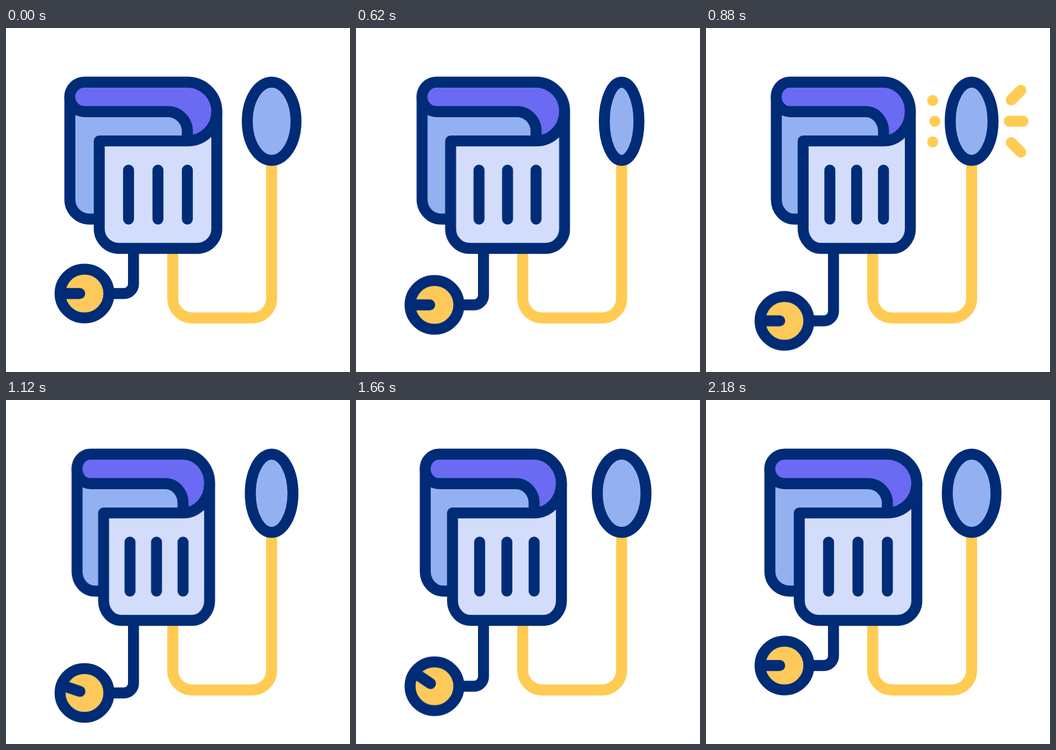
Write an HTML page that moves like this. It is 640x640 px and loops after 2400 ms.

```html
<!DOCTYPE html>
<html lang="en">
<head>
<meta charset="utf-8">
<title>Blood pressure monitor</title>
<style>
  html, body { margin: 0; width: 100%; height: 100%; overflow: hidden; background: #fff; }
  svg {
    display: block; width: 640px; height: 640px;
    --navy: #002c77; --yellow: #ffcb52; --blue: #93b1f1; --pale: #d3ddfb; --violet: #6b6af2;
    fill: none; stroke: var(--navy); stroke-width: 20.4;
    stroke-linecap: round; stroke-linejoin: round;
  }

  /* This curve is an exact smoothstep between keyframes. */
  .cuff, .bulb, .gauge, .needle, .ray {
    animation: 2400ms cubic-bezier(.33333, 0, .66667, 1) infinite;
  }
  .cuff { animation-name: tighten; transform-origin: 255.5px 0; }
  .cuff * { vector-effect: non-scaling-stroke; }
  .bulb { animation-name: squeeze; }
  .gauge { animation-name: drop; }
  .needle { animation-name: turn; transform-origin: 146px 494px; }
  .rays { stroke: var(--yellow); animation: show 2400ms step-end infinite; }
  .ray { animation-name: trim; }

  @keyframes tighten {
    0%, 16.667%, 91.667%, 100% { transform: scaleX(1); }
    41.667%, 58.333% { transform: scaleX(.902); }
  }
  @keyframes squeeze {
    0%, 16.667%, 41.667%, 66.667%, 100% { rx: 45.3px; }
    29.167%, 54.167% { rx: 29.5px; }
  }
  @keyframes drop {
    0%, 16.667%, 83.333%, 100% { transform: translateY(0); }
    37.5%, 62.5% { transform: translateY(51px); }
  }
  @keyframes turn {
    0%, 37.5%, 83.333%, 100% { transform: rotate(0deg); }
    58.333%, 62.5% { transform: rotate(45deg); }
  }
  @keyframes show {
    0%, 41.667%, 66.667% { opacity: 0; }
    29.167%, 54.167% { opacity: 1; }
  }
  /* Each ray grows outwards, then empties from its inner end. */
  @keyframes trim {
    0%, 29.167% { stroke-dasharray: 0 2; stroke-dashoffset: 0; }
    35.833% { stroke-dasharray: 1 2; stroke-dashoffset: 0; }
    41.667% { stroke-dasharray: 0 2; stroke-dashoffset: -1; }
    41.668%, 54.167% { stroke-dasharray: 0 2; stroke-dashoffset: 0; }
    60.833% { stroke-dasharray: 1 2; stroke-dashoffset: 0; }
    66.667%, 100% { stroke-dasharray: 0 2; stroke-dashoffset: -1; }
  }
</style>
</head>
<body>
<svg viewBox="0 0 640 640">
  <g class="gauge">
    <path d="M237.2 340V476a18 18 0 0 1-18 18H190"/>
    <circle cx="146" cy="494" r="45.4" fill="#fdc95b"/>
    <path class="needle" d="M106 494H137.1"/>
  </g>

  <path stroke="var(--yellow)" d="M310.2 400V503a36.5 36.5 0 0 0 36.5 36.5H457.7a36.5 36.5 0 0 0 36.5-36.5V240"/>

  <g class="cuff">
    <path fill="var(--blue)" d="M118.8 128V319a36.5 36.5 0 0 0 36.5 36.5H337.5V192a36.5 36.5 0 0 0-36.5-36.5H146"/>
    <path fill="var(--violet)" d="M146 100.7H337.5a54.7 54.7 0 0 1 0 109.4V192a36.5 36.5 0 0 0-36.5-36.5H146a27.4 27.4 0 0 1 0-54.8Z"/>
    <path fill="var(--pale)" d="M173.5 210.1H337.5a54.7 54.7 0 0 0 54.7-54.7V373.5a36.5 36.5 0 0 1-36.5 36.5H210a36.5 36.5 0 0 1-36.5-36.5Z"/>
    <path d="M228 264.5V355.5M282.7 264.5V355.5M337.4 264.5V355.5"/>
  </g>

  <ellipse class="bulb" cx="494.2" cy="173.5" rx="45.3" ry="72.8" fill="var(--blue)"/>

  <g class="rays">
    <g id="side" transform="translate(494.2 173.5)">
      <path class="ray" pathLength="1" d="M72.5-38.5l19-19"/>
      <path class="ray" pathLength="1" d="M68.5 0h27"/>
      <path class="ray" pathLength="1" d="M72.5 38.5l19 19"/>
    </g>
    <use href="#side" transform="translate(988.4) scale(-1 1)"/>
  </g>
</svg>
</body>
</html>
```
